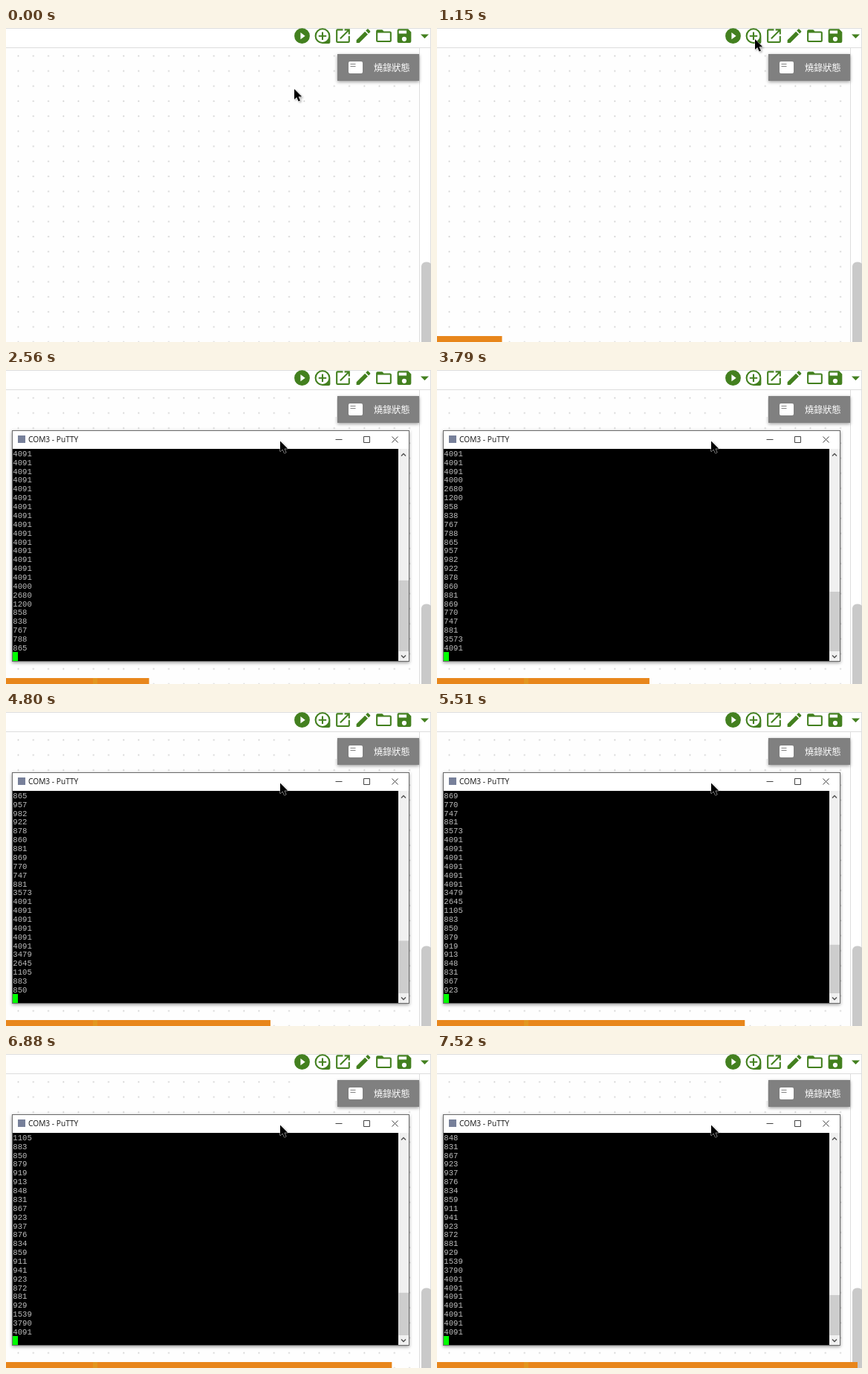
An HTML page for the animation above (7.57 s loop, 572 by 422 pixels).

```html
<!DOCTYPE html>
<html lang="zh-Hant">
<head>
<meta charset="utf-8">
<title>Serial monitor</title>
<style>
  html, body { margin: 0; width: 572px; height: 422px; overflow: hidden; background: #fff; }
  svg { display: block; }
  #rows { font: 10.67px "Liberation Mono", monospace; fill: #bbb; }
</style>
</head>
<body>
<svg width="572" height="422" viewBox="0 0 572 422">
  <defs>
    <pattern id="dots" x="6.5" y="27.6" width="20.25" height="20.23" patternUnits="userSpaceOnUse">
      <rect x="9.2" y="9.2" width="1.7" height="1.7" rx=".5" fill="#c4c4c4"/>
    </pattern>
    <filter id="soft" x="-20%" y="-20%" width="140%" height="140%">
      <feDropShadow dx="0" dy="1.5" stdDeviation="2" flood-opacity=".4"/>
    </filter>
    <filter id="tip" x="-50%" y="-50%" width="220%" height="220%">
      <feDropShadow dx="1.5" dy="1.5" stdDeviation="1" flood-opacity=".35"/>
    </filter>
  </defs>

  <!-- workspace -->
  <rect y="27" width="556" height="395" fill="#fefefe"/>
  <rect y="27" width="556" height="395" fill="url(#dots)"/>
  <path d="M0 .5H572M0 26.5H572M556.5 27V422M571.5 0V422" stroke="#dedede"/>
  <rect x="559" y="314.5" width="14" height="130" rx="6" fill="#c9c9c9"/>
  <g id="icons" fill="#43801f" fill-rule="evenodd"></g>
  <path d="M558 8.5h11l-5.5 5.5z" fill="#43801f"/>

  <!-- status button -->
  <rect x="446" y="35" width="110" height="36" fill="#808080" filter="url(#soft)"/>
  <rect x="461" y="45" width="19" height="16" rx="2" fill="#fff"/>
  <path d="M463.5 48.5h7M463.5 51.5h7" stroke="#808080"/>
  <text x="495" y="57.5" fill="#fff" style="font: 12.2px 'Noto Sans CJK TC', 'Noto Sans CJK', sans-serif">燒錄狀態</text>

  <!-- terminal window -->
  <g id="terminal">
    <rect x="396" y="34" width="49" height="29" fill="#fefefe"/>
    <rect x="8" y="81" width="535" height="311" fill="#6b6b6b" filter="url(#soft)"/>
    <rect x="9" y="82" width="533" height="24" fill="#fff"/>
    <rect x="16" y="88" width="10" height="10" fill="#77809a"/>
    <text x="30" y="97" fill="#111" style="font: 10.2px 'Open Sans', sans-serif">COM3 - PuTTY</text>
    <path d="M443.5 93.5h9M481.5 89.5h8v8h-8zM519.5 89.5l8 8m0-8l-8 8" fill="none" stroke="#444"/>
    <rect x="9" y="106" width="519" height="285" fill="#000"/>
    <rect x="528" y="106" width="14" height="285" fill="#f0f0f0"/>
    <path d="M532 115.5l3-3 3 3M532 383.5l3 3 3-3" fill="none" stroke="#505050" stroke-width="1.4"/>
    <rect id="thumb" x="528.5" width="13.5" fill="#cdcdcd"/>
    <g id="rows"></g>
    <rect x="9" y="379" width="7" height="12" fill="#0f0"/>
  </g>

  <!-- progress bar -->
  <rect id="bar" y="414" height="8" fill="#e8861b"/>
  <rect id="notch" x="117" y="414" width="6" height="8" fill="#e2961f"/>

  <path id="pointer" d="M0 0v14l3.2-3 2.4 5.4 2.4-1-2.4-5.2h4.6z" fill="#000" stroke="#fff" stroke-width=".8"
        paint-order="stroke" filter="url(#tip)"/>
</svg>

<script>
const LOOP = 7570, OPEN = 1620, SCROLL = 1680, LINE_MS = 103.4;
const ROWS = 23, PITCH = 11.87;
const $ = id => document.getElementById(id);

function add(parent, tag, attrs) {
  const el = document.createElementNS("http://www.w3.org/2000/svg", tag);
  for (const key in attrs) el.setAttribute(key, attrs[key]);
  return parent.appendChild(el);
}

// toolbar: run, add, open, edit, folder, save (24-unit boxes)
[
  "M12 2a10 10 0 1 0 0 20 10 10 0 0 0 0-20zM10 16.5v-9l6 4.5z",
  "M12 2a10 10 0 1 0 0 20h8a2 2 0 0 0 2-2v-8A10 10 0 0 0 12 2zM12 4a8 8 0 0 1 0 16 8 8 0 0 1 0-16zM13 7h-2v4H7v2h4v4h2v-4h4v-2h-4z",
  "M19 19H5V5h7V3H5a2 2 0 0 0-2 2v14a2 2 0 0 0 2 2h14a2 2 0 0 0 2-2v-7h-2zM14 3v2h3.6l-9.8 9.8 1.4 1.4L19 6.4V10h2V3z",
  "M3 17.25V21h3.75L17.8 9.94l-3.75-3.75zM20.7 7.04a1 1 0 0 0 0-1.41l-2.33-2.34a1 1 0 0 0-1.41 0l-1.83 1.83 3.75 3.75z",
  "M20 6h-8l-2-2H4a2 2 0 0 0-2 2v12a2 2 0 0 0 2 2h16a2 2 0 0 0 2-2V8a2 2 0 0 0-2-2zM20 18H4V8h16z",
  "M17 3H5a2 2 0 0 0-2 2v14a2 2 0 0 0 2 2h14a2 2 0 0 0 2-2V7zM12 19a3 3 0 0 1 0-6 3 3 0 0 1 0 6zM15 9H5V5h10z"
].forEach((d, i) => add($("icons"), "path", {
  d, transform: `translate(${386 + i * 27.5} -1.8) scale(1.04)`
}));

const full = n => Array(n).fill(4091);
const values = [
  ...full(ROWS), 4000, 2680, 1200, 858, 838, 767, 788, 865, 957, 982, 922, 878, 860, 881, 869, 770, 747, 881, 3573,
  ...full(6), 3479, 2645, 1105, 883, 850, 879, 919, 913, 848, 831, 867, 923, 937, 876, 834, 859, 911, 941, 923,
  872, 881, 929, 1539, 3790, ...full(7)
];
const rows = Array.from({ length: ROWS }, (_, i) =>
  add($("rows"), "text", { x: 9.3, y: 115.8 + i * PITCH }));

// bursts of steps: first time, last time, count
const bursts = [
  [60, 760, 10], [830, 1550, 10], [1620, 2320, 10], [2410, 3100, 10], [3180, 3870, 10],
  [3950, 4660, 10], [4730, 5420, 10], [5510, 6260, 11], [6340, 7030, 10], [7110, 7520, 6]
];
function stepAt(t) {
  let step = 0;
  for (const [from, to, count] of bursts) {
    if (t < from) break;
    step += Math.min(count, 1 + Math.floor((t - from) / (to - from) * (count - 1) + 0.05));
  }
  return step;
}

function draw(t) {
  const open = t >= OPEN;
  const step = stepAt(t);
  const width = step * 566 / 97;
  $("bar").setAttribute("width", width);
  $("notch").style.display = width > 122 ? "" : "none";
  $("terminal").style.display = open ? "" : "none";

  const u = Math.min(1, step / 10), ease = u * u * (3 - 2 * u);
  const [x, y] = open ? [369, 95.5] : [388 + 40 * ease, 82 - 67 * ease];
  $("pointer").setAttribute("transform", `translate(${x} ${y})`);

  const lines = Math.min(values.length - ROWS, Math.max(0, Math.floor((t - SCROLL) / LINE_MS)));
  rows.forEach((row, i) => row.textContent = values[lines + i]);
  const size = 6000 / (55 + lines);
  $("thumb").setAttribute("y", 378 - size);
  $("thumb").setAttribute("height", size);
}

const start = performance.now();
function tick() {
  draw((performance.now() - start) % LOOP);
  requestAnimationFrame(tick);
}
tick();
</script>
</body>
</html>
```
